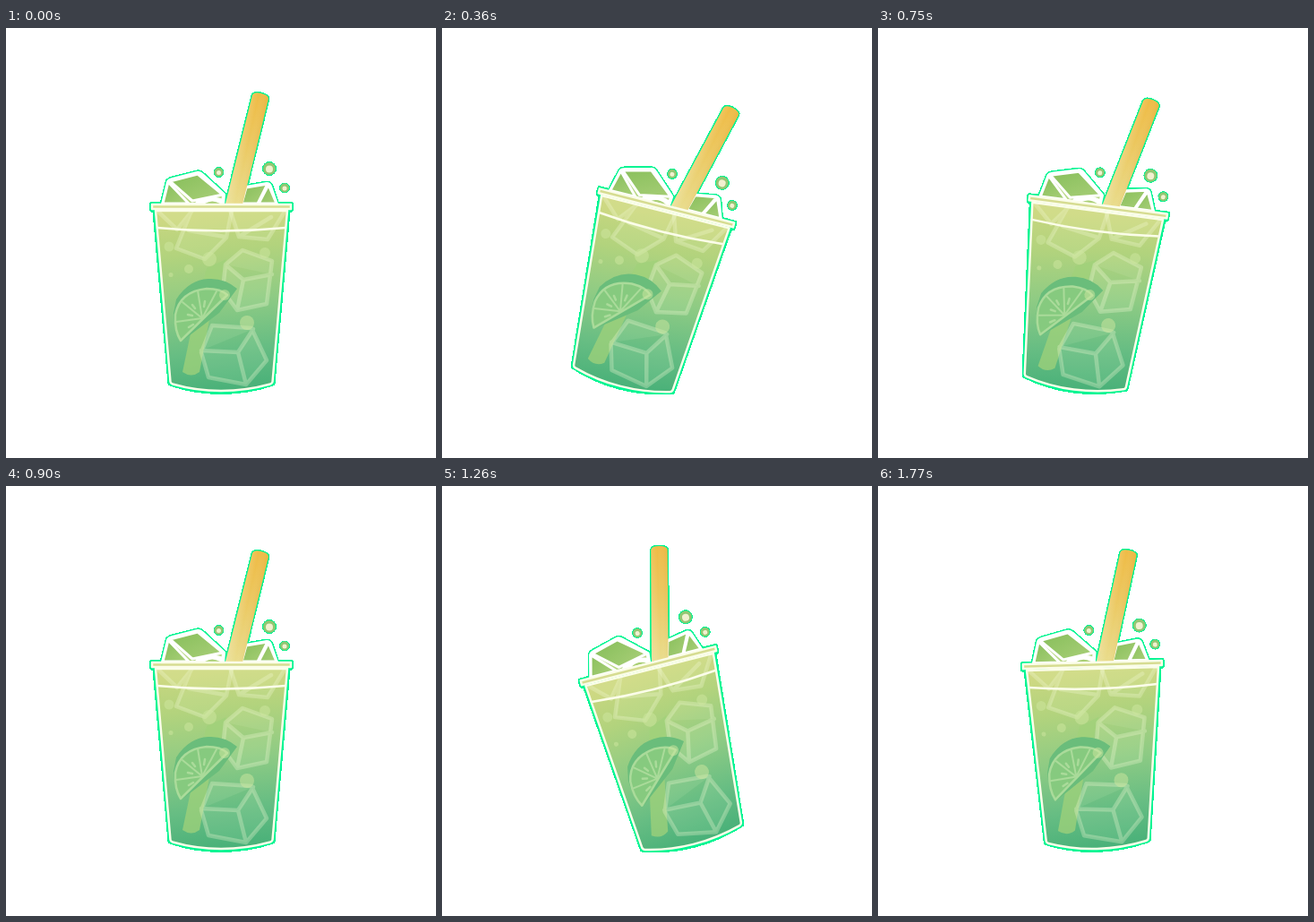
An HTML page that plays this animation: 480x480 px, repeating every 1.8 s.

```html
<!DOCTYPE html>
<html lang="en">
<head>
<meta charset="utf-8">
<title>Swaying iced drink</title>
<style>
html, body { margin: 0; width: 100%; height: 100%; overflow: hidden; background: #fff; }
svg { display: block; width: 100vw; height: 100vh; }
path, g { stroke-linejoin: round; stroke-linecap: round; }
</style>
</head>
<body>
<svg viewBox="0 0 480 480">
  <defs>
    <linearGradient id="tea" gradientUnits="userSpaceOnUse" x1="228" y1="198" x2="252" y2="406">
      <stop offset="0" stop-color="#cbd780"/>
      <stop offset=".25" stop-color="#b2d37d"/>
      <stop offset=".52" stop-color="#8ecb84"/>
      <stop offset=".78" stop-color="#66bd83"/>
      <stop offset="1" stop-color="#48b078"/>
    </linearGradient>
    <linearGradient id="gold" gradientUnits="userSpaceOnUse" x1="284" y1="72" x2="255" y2="196">
      <stop offset="0" stop-color="#efbb45"/>
      <stop offset=".4" stop-color="#ecc65c"/>
      <stop offset="1" stop-color="#e9dc8c"/>
    </linearGradient>
    <linearGradient id="shine" gradientUnits="userSpaceOnUse" x1="258" y1="130" x2="281" y2="135">
      <stop offset="0" stop-color="#fff" stop-opacity=".2"/>
      <stop offset=".5" stop-color="#fff" stop-opacity="0"/>
      <stop offset="1" stop-color="#c88a20" stop-opacity=".14"/>
    </linearGradient>
    <linearGradient id="ice" x1="0" y1="0" x2="1" y2="1">
      <stop offset="0" stop-color="#86be5a"/>
      <stop offset="1" stop-color="#a9cf78"/>
    </linearGradient>
    <path id="cup" d="M162.500 196.500H318.500V203L315 205 298 397Q270 406.500 240 406.500T183 397L166 205 162.500 203Z"/>
    <path id="body" d="M167 204H314L297.500 395Q297 397 295 397.500 268 405 240 405T186 397.500Q184 397 183.500 395Z"/>
    <path id="cubes" d="M175 197L181 172Q182 170 186 169L213 162Q216 161 219 164L243 186 242 197ZM263 197L268 178 291 174Q294 174 295 177L302 197Z"/>
    <path id="straw" d="M245 196L275 75Q277 71 285 73T293 79L264 197Z"/>
    <g id="fizz">
      <circle cx="237.500" cy="161" r="5"/>
      <circle cx="294" cy="157" r="7"/>
      <circle cx="311" cy="178.500" r="5"/>
    </g>
    <clipPath id="inside"><use href="#body"/></clipPath>
  </defs>

  <g id="drink">
    <g stroke="#00f593" fill="#00f593" shape-rendering="crispEdges">
      <use href="#cup" stroke-width="5"/>
      <use href="#cubes" stroke-width="7"/>
      <use href="#straw" stroke-width="3"/>
      <use href="#fizz" stroke-width="2"/>
    </g>

    <g fill="#93c672"><use href="#fizz"/></g>
    <g fill="#f3f0d0">
      <circle cx="237.500" cy="161.500" r="2.500"/>
      <circle cx="294" cy="157.500" r="4"/>
      <circle cx="311" cy="179" r="2.500"/>
    </g>

    <!-- ice above the rim -->
    <use href="#cubes" fill="#b9d886" stroke="#fff" stroke-width="4"/>
    <g fill="url(#ice)" stroke="#fff" stroke-width="3">
      <path d="M183 171L214 163 242 186 208 193Z"/>
      <path d="M181 172L204 196H175Z"/>
      <path d="M268 178L292 174 281 196H263Z"/>
      <path d="M293 175L302 196H282Z"/>
    </g>
    <path d="M211 196Q213 189 220 191 229 186 243 191V196Z" fill="#fff"/>
    <path d="M222 196Q230 191 239 196Z" fill="#a9cf74"/>

    <use href="#straw" fill="url(#gold)"/>
    <use href="#straw" fill="url(#shine)"/>

    <use href="#body" fill="url(#tea)"/>
    <g clip-path="url(#inside)">
      <path d="M166 204H315L313 224Q240 231 168 224Z" fill="#e0db8c" opacity=".25"/>

      <!-- sunken straw -->
      <path d="M246 258L228 320 216 384Q207 391 197 384L205 346 224 268Z" fill="#a0d27a" opacity=".75"/>

      <g stroke="#f2f8d4" stroke-opacity=".3" stroke-width="4.500" fill="#f2f8d4" fill-opacity=".09">
        <path d="M171 206L191 225 207 205M207 204L190 246 222 258 246 234 252 204M204 226L244 233"/>
        <path d="M250 203L260 233 292 236 311 205M260 233L296 211"/>
        <path d="M245 264L264 248 297 260 291 308 258 315 242 293ZM245 264L265 281 297 275M265 281L258 315"/>
        <path d="M230 332L274 335 291 371 268 398 226 390 218 362ZM218 360L259 362 276 336M259 362L268 398"/>
      </g>

      <!-- lime wedge -->
      <path d="M258 291Q244 279 226 280 204 281 190 303L187 318Q187 338 196 350L238 318Z" fill="#6abd7b"/>
      <path d="M247 298Q240 291 224 291 194 294 189 320 188 338 195 349Z" fill="#86ca7f" stroke="#aadb9a" stroke-width="2.500"/>
      <g stroke="#aadb9a" stroke-width="2" fill="none">
        <path d="M219 324L190 328M219 324L197 306M219 324L214 293M219 324L235 294"/>
        <path d="M204 334L209 331M203 320L208 321M208 309L211 313M222 305L221 311" stroke-width="2.500"/>
      </g>

      <g fill="#d0e7a0" fill-opacity=".5">
        <circle cx="227" cy="258" r="8"/>
        <circle cx="204" cy="269" r="5"/>
        <circle cx="182" cy="244" r="5.500"/>
        <circle cx="184" cy="275.500" r="2.500"/>
        <circle cx="289" cy="251" r="6"/>
        <circle cx="244" cy="298" r="6"/>
        <circle cx="269" cy="329" r="8"/>
      </g>
    </g>

    <g fill="none" stroke="#fbfde9" stroke-width="2.500">
      <use href="#body"/>
      <path d="M169 223Q240 230 312 223"/>
      <path d="M163 197H318V202H163Z" fill="#d6dc91"/>
    </g>
  </g>
</svg>
<script>
const drink = document.getElementById("drink");
const LOOP = 1800, STEP = 30, SWING = 15;
const start = performance.now();

function draw() {
  const elapsed = (performance.now() - start) % LOOP;
  const time = Math.floor(elapsed / STEP) * STEP;
  const angle = SWING * Math.sin(time / LOOP * 2 * Math.PI);
  drink.setAttribute("transform", `rotate(${angle} 240 240)`);
  requestAnimationFrame(draw);
}
draw();
</script>
</body>
</html>
```
